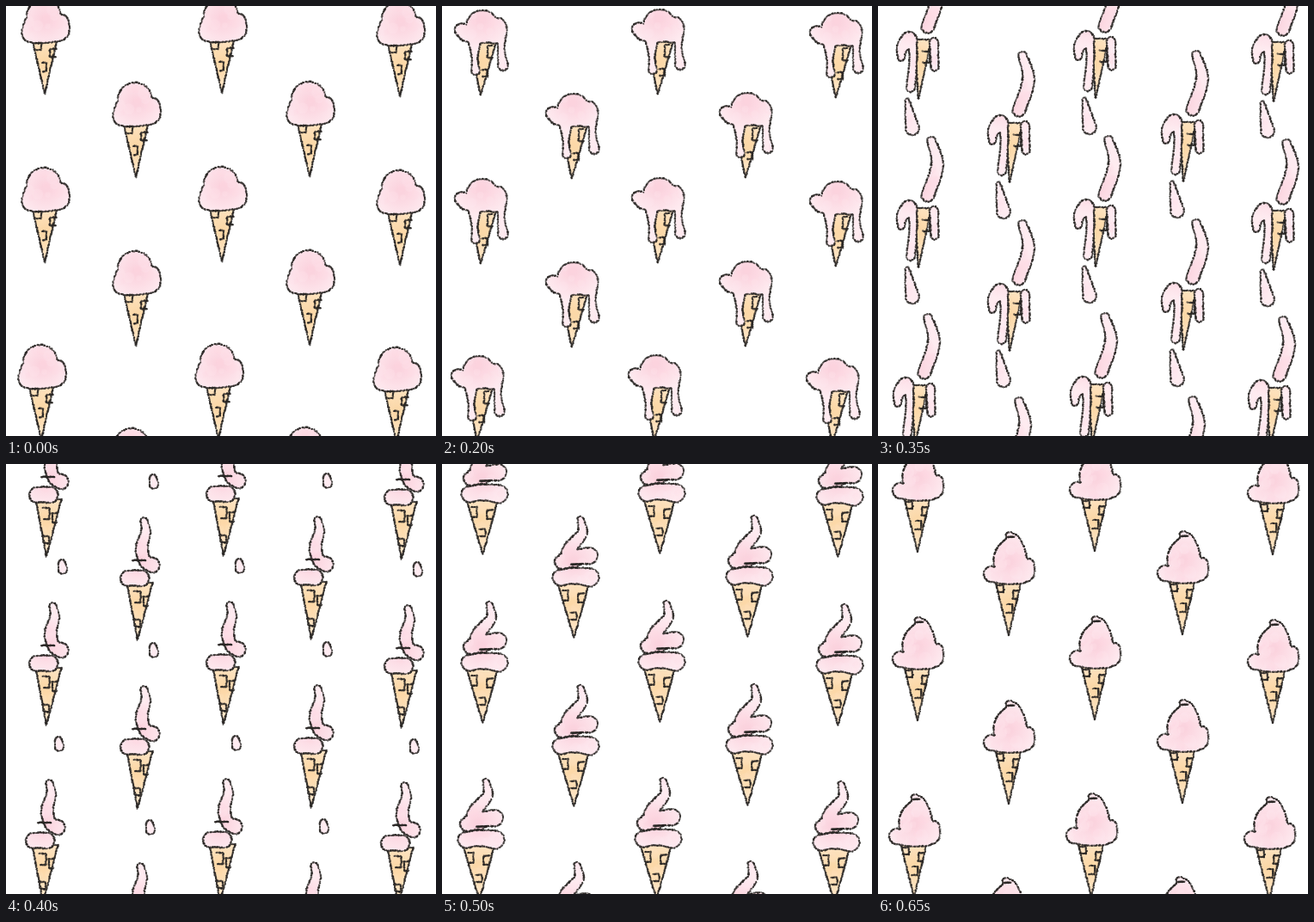
Animation, 500 px wide and 500 px high, one loop 700 ms. Source, as an HTML page with a canvas:

```html
<!DOCTYPE html>
<html lang="en">
<head>
<meta charset="utf-8">
<title>Melting ice cream</title>
<style>
html, body { margin: 0; width: 100%; height: 100%; overflow: hidden; background: #fff; }
canvas { display: block; width: 500px; height: 500px; }
</style>
</head>
<body>
<canvas id="stage" width="500" height="500"></canvas>
<script>
const STEP = 50, SAMPLES = 40;
const TOP = 100, SPRITE_W = 100, SPRITE_H = 260;
const INK = '#292624';
const PINK = ['#fbd3de', '#feebf0'], WAFER = ['#fbd8a8', '#fde7cb'];

const lerp = (a, b, k) => a.map((v, i) => v + (b[i] - v) * k);

// A tube is a smooth run of discs [x, y, radius] through a few keys.
function tube(keys) {
  const last = keys.length - 1;
  return Array.from({ length: SAMPLES }, (_, n) => {
    const at = last * n / (SAMPLES - 1);
    const i = Math.min(Math.floor(at), Math.max(last - 1, 0)), u = at - i;
    const [a, b, c, d] = [-1, 0, 1, 2].map(j => keys[Math.max(0, Math.min(last, i + j))]);
    return b.map((v, q) => v + 0.5 * u * (c[q] - a[q] +
      u * (2 * a[q] - 5 * v + 4 * c[q] - d[q] + u * (3 * v - a[q] - 3 * c[q] + d[q]))));
  });
}

// cone: left x, right x, top y, tip x, tip y; marks: x, y, width, height.
function pose(cone, marks, ice, seams = false) {
  const tubes = {};
  for (const name in ice) tubes[name] = tube(ice[name]);
  return { cone, marks, ice: tubes, seams };
}

// A part that is new in b grows out of its first disc.
function mix(a, b, k = 0.5) {
  const ice = {};
  for (const name in b.ice) {
    ice[name] = b.ice[name].map((d, i) => lerp(a.ice[name]?.[i] || b.ice[name][0], d, k));
  }
  return {
    cone: lerp(a.cone, b.cone, k),
    marks: b.marks.map((m, i) => a.marks[i] ? lerp(a.marks[i], m, k) : m),
    ice, seams: b.seams
  };
}

const ball = pose([30, 60, 233, 45, 298],
  [[34, 239, 7, 8], [51, 246, 7, 9], [42, 262, 5, 10]], {
    dome: [[44, 208, 20]],
    skirt: [[29, 214, 7], [27, 229, 8], [44, 230, 9], [65, 228, 7], [64, 215, 9]]
  });

const runny = pose([29, 61, 233, 46, 297],
  [[53, 246, 6, 10], [44, 265, 6, 9]], {
    dome: [[46, 213, 20]],
    skirt: [[28, 214, 7], [28, 228, 8], [45, 230, 7], [62, 227, 8], [64, 215, 9]],
    left: [[44, 235, 5], [42, 257, 4.5]],
    right: [[66, 226, 6], [72, 237, 4], [74, 251, 3.5]]
  });

const melt = pose([31, 64, 234, 45, 300],
  [[46, 270, 7, 8], [53, 242, 6, 14]], {
    dome: [[47, 220, 19]],
    skirt: [[23, 224, 8], [30, 231, 7], [46, 230, 8], [65, 231, 8], [65, 220, 10]],
    left: [[38, 238, 7], [38, 256, 3.5], [39, 271, 5]],
    right: [[69, 232, 5], [69, 248, 4], [71, 265, 6]]
  });

const puddle = pose([42, 62, 235, 47, 304],
  [[52, 249, 8, 13]], {
    dome: [[36, 235, 9]],
    skirt: [[27, 256, 4], [28, 245, 6], [36, 236, 9], [41, 238, 4]],
    left: [[40, 238, 5], [41, 258, 4.5], [38, 291, 5]],
    right: [[65, 238, 5], [66, 267, 4.5]],
    top: [[62, 157, 5], [69, 185, 7], [58, 220, 7.5]],
    tear: [[34, 306, 2.5], [40, 338, 8]]
  });

const curl = pose([27, 67, 239, 47, 303],
  [[34, 245, 7, 13], [54, 253, 6, 11], [44, 280, 6, 8], [41, 211, 16, 0]], {
    base: [[36, 232, 9], [50, 231, 9], [66, 232, 10]],
    top: [[47, 174, 3.5], [47, 187, 4.5], [35, 205, 7], [46, 217, 7], [70, 213, 10]],
    drop: [[65, 115, 4], [67, 130, 6.5]]
  }, true);

const swirl = pose([30, 63, 237, 48, 299],
  [[35, 247, 5, 11], [51, 246, 7, 10], [43, 263, 8, 9], [46, 220, 11, 0]], {
    base: [[28, 230, 9.5], [46, 227, 10], [66, 230, 11]],
    middle: [[33, 213, 8], [50, 206, 12], [63, 209, 8]],
    top: [[63, 152, 3], [67, 172, 7], [50, 190, 8], [40, 196, 9], [61, 198, 9]]
  });

const peak = pose([30, 61, 234, 46, 298],
  [[32, 240, 8, 8], [51, 246, 6, 10], [43, 262, 7, 10], [44, 184, 8, 0]], {
    base: [[26, 227, 9], [46, 230, 9], [66, 228, 8], [68, 217, 8]],
    top: [[47, 182, 4], [51, 190, 9], [48, 208, 19], [48, 215, 18]]
  });

const POSES = [
  ball, mix(ball, runny), runny, mix(runny, melt),
  melt, mix(melt, puddle, 1 / 3), mix(melt, puddle, 2 / 3), puddle,
  mix(puddle, curl), curl, mix(curl, swirl), swirl, mix(swirl, peak), peak
];

function randomFrom(seed) {
  return () => {
    seed = (seed * 1664525 + 1013904223) >>> 0;
    return seed / 4294967296;
  };
}

// Watercolour: deeper in the middle, with soft blots.
function wash(g, path, [core, rim], cy, rnd) {
  g.save();
  g.clip(path);
  const fill = g.createRadialGradient(46, cy, 4, 46, cy, 34);
  fill.addColorStop(0, core);
  fill.addColorStop(1, rim);
  g.fillStyle = fill;
  g.fillRect(0, TOP, SPRITE_W, SPRITE_H);
  g.globalAlpha = 0.16;
  for (let i = 0; i < 160; i++) {
    g.fillStyle = i % 2 ? rim : core;
    g.beginPath();
    g.arc(rnd() * SPRITE_W, TOP + rnd() * SPRITE_H, 3 + rnd() * 5, 0, 7);
    g.fill();
  }
  g.restore();
}

function grain(g, x, y, rnd) {
  const shake = () => (rnd() - 0.5) * 1.1;
  g.globalAlpha = 0.55 + rnd() * 0.4;
  g.fillStyle = INK;
  g.beginPath();
  g.arc(x + shake(), y + shake(), 0.75 + rnd() * 0.55, 0, 7);
  g.fill();
  g.globalAlpha = 1;
}

function crayon(g, points, rnd) {
  for (let i = 1; i < points.length; i++) {
    const a = points[i - 1], b = points[i];
    const n = Math.ceil(Math.hypot(b[0] - a[0], b[1] - a[1]) / 0.8);
    for (let j = 0; j < n; j++) grain(g, ...lerp(a, b, j / n), rnd);
  }
}

// Fills the union of the discs and inks only its outer edge.
function blob(g, discs, rnd) {
  const path = new Path2D(), inked = new Set();
  for (const [x, y, r] of discs) {
    path.moveTo(x + r, y);
    path.arc(x, y, r, 0, 2 * Math.PI);
  }
  wash(g, path, PINK, 212, rnd);
  for (const [x, y, r] of discs) {
    for (let a = 0; a < 2 * Math.PI; a += 0.8 / r) {
      const px = x + r * Math.cos(a), py = y + r * Math.sin(a);
      const cell = Math.round(px) + ',' + Math.round(py);
      if (inked.has(cell)) continue;
      if (discs.some(d => Math.hypot(px - d[0], py - d[1]) < d[2] - 0.15)) continue;
      inked.add(cell);
      grain(g, px, py, rnd);
    }
  }
}

const sprites = POSES.map((p, i) => {
  const sheet = document.createElement('canvas');
  sheet.width = SPRITE_W;
  sheet.height = SPRITE_H;
  const g = sheet.getContext('2d'), rnd = randomFrom(41 + i * 97);
  g.translate(0, -TOP);

  const [left, right, top, tipX, tipY] = p.cone;
  const wafer = [[left, top], [tipX, tipY], [right, top], [left, top]];
  wash(g, new Path2D('M' + wafer.join('L') + 'Z'), WAFER, 262, rnd);
  crayon(g, wafer, rnd);

  const tubes = Object.values(p.ice);
  for (const discs of p.seams ? tubes : [tubes.flat()]) blob(g, discs, rnd);

  p.marks.forEach(([x, y, w, h], n) => {
    const near = n % 2 ? x : x + w, far = n % 2 ? x + w : x;
    crayon(g, [[far, y], [near, y], [near, y + h], [far, y + h]], rnd);
  });
  return sheet;
});

// Columns of the pattern: x, y of the middle cone.
const COLUMNS = [[0, 0], [106, 97], [206, -1], [308, 96], [413, 3]];
const ROWS = [[0, -196], [0, 0], [-4, 206]];
const ctx = document.getElementById('stage').getContext('2d');
let shown = -1;

function draw() {
  const step = Math.floor(performance.now() / STEP) % POSES.length;
  if (step !== shown) {
    shown = step;
    ctx.fillStyle = '#fff';
    ctx.fillRect(0, 0, 500, 500);
    for (const [cx, cy] of COLUMNS) {
      for (const [rx, ry] of ROWS) ctx.drawImage(sprites[step], cx + rx, cy + ry + TOP);
    }
  }
  requestAnimationFrame(draw);
}
draw();
</script>
</body>
</html>
```
